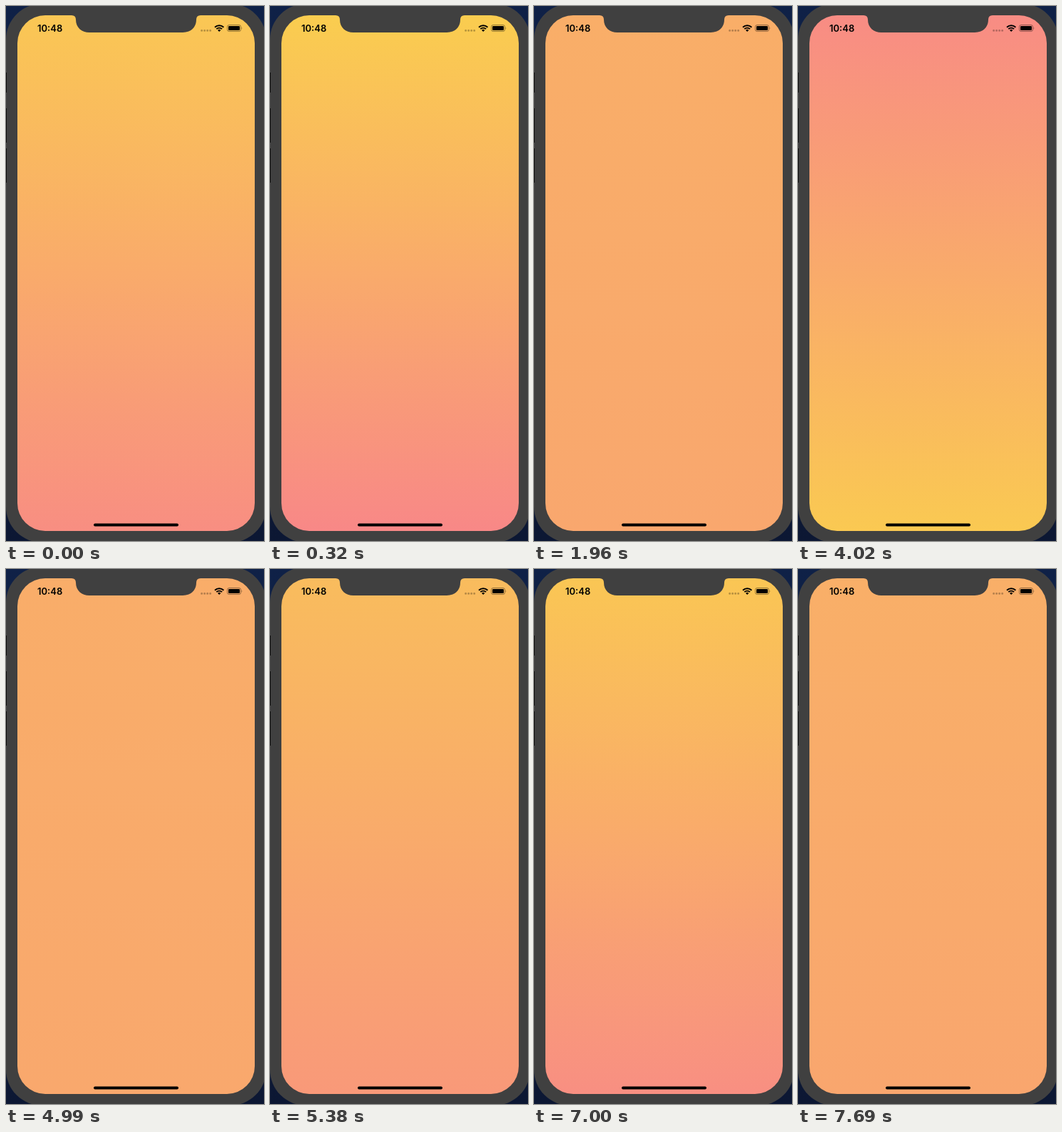
These frames come from a looping animation (362 px wide and 748 px high, 8 s). An HTML page:

```html
<!DOCTYPE html>
<html lang="en">
<head>
<meta charset="utf-8">
<title>Gradient screen</title>
<style>
  html, body { margin: 0; width: 100%; height: 100%; overflow: hidden; background: #0d1c3d; }
  svg { display: block; width: 100%; height: 100%; }
  text { font: 600 13px Inter, "Liberation Sans", sans-serif; }
</style>
</head>
<body>
<svg viewBox="0 0 362 748">
  <defs>
    <linearGradient id="sky" x1="0" y1="0" x2="0" y2="1">
      <stop id="top" offset="0"/>
      <stop id="bottom" offset="1"/>
    </linearGradient>
    <linearGradient id="desk" x1="0" y1="0" x2="0" y2="1">
      <stop offset="0" stop-color="#0f2147"/>
      <stop offset="1" stop-color="#0c1733"/>
    </linearGradient>
  </defs>

  <!-- Phone body -->
  <rect width="362" height="748" fill="url(#desk)"/>
  <rect y="-3" width="365" height="753" rx="50" fill="#404040"/>
  <path d="M.5 93v28m0 22v48m0 8v48" stroke="#0a0a0a"/>

  <!-- Screen and notch -->
  <rect x="16" y="13" width="333" height="721" rx="39" fill="url(#sky)"/>
  <path d="M92 12V13Q98 13 98 19C98 30 106 37 117 37H248C259 37 267 30 267 19Q267 13 273 13V12Z" fill="#404040"/>

  <!-- Status bar -->
  <text x="44" y="35.8">10:48</text>
  <path d="M274.6 34.3h.01m4 0h.01m4 0h.01m4 0h.01" stroke="#000" stroke-opacity=".27"
        stroke-width="3" stroke-linecap="round"/>
  <g fill="none" stroke="#000" stroke-width="1.9">
    <path d="M293 29.7A8.9 8.9 0 0 1 305.4 29.7"/>
    <path d="M295.3 32.2A5.5 5.5 0 0 1 303.1 32.2"/>
  </g>
  <path d="M299.2 36L297 33.8A3.1 3.1 0 0 1 301.4 33.8Z"/>
  <rect x="310.5" y="26.5" width="19" height="9" rx="2.6" fill="none" stroke="#000" stroke-opacity=".4"/>
  <rect x="312" y="28" width="16" height="6" rx="1.2"/>
  <path d="M330.7 29.5Q332.2 31 330.7 32.5Z" fill-opacity=".45"/>

  <rect x="123" y="723.5" width="119" height="4" rx="2"/>
</svg>
<script>
const LOOP = 8000, PERIOD = 5745, PEAK = 615;
const YELLOW = [250, 207, 77], PINK = [248, 134, 137];
// The screen redraws only at these moments, in ms.
const TICKS = [0, 320, 640, 960, 1280, 1610, 1960, 2360, 2590, 2930, 3280, 3650, 4020,
  4420, 4590, 4990, 5380, 5670, 6020, 6340, 6680, 7000, 7370, 7690];

const [top_, bottom] = ["top", "bottom"].map(id => document.getElementById(id));
const mix = k => `rgb(${YELLOW.map((c, i) => Math.round(c + (PINK[i] - c) * k))})`;

function draw(now) {
  const time = now % LOOP;
  const tick = TICKS.findLast(t => t <= time) ?? 0;
  const swap = (1 - Math.cos(2 * Math.PI * (tick - PEAK) / PERIOD)) / 2;
  top_.setAttribute("stop-color", mix(swap));
  bottom.setAttribute("stop-color", mix(1 - swap));
}

let start;
function loop(now) {
  start ??= now;
  draw(now - start);
  requestAnimationFrame(loop);
}
draw(0);
requestAnimationFrame(loop);
</script>
</body>
</html>
```
